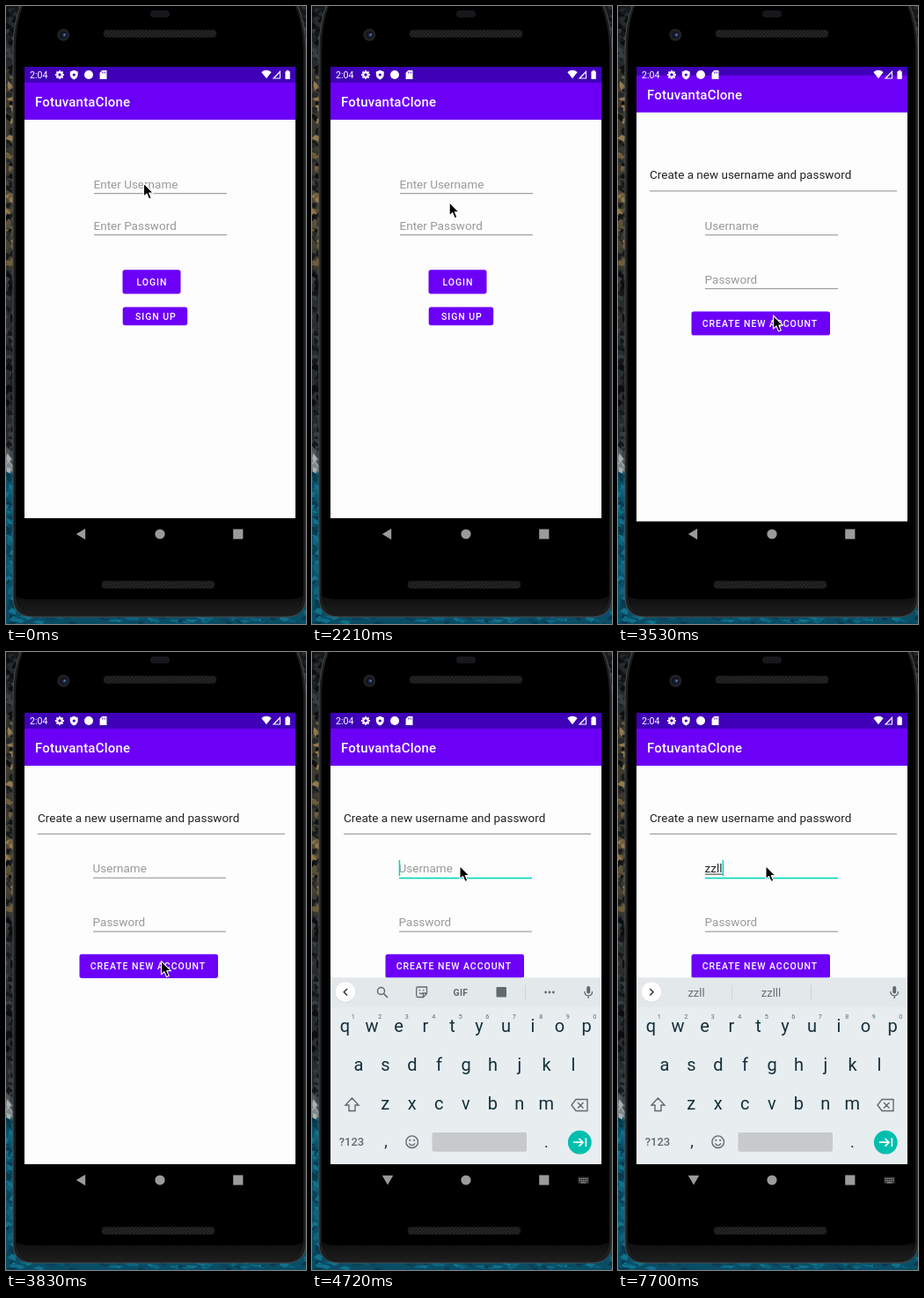
Recreate the animation shown at these times as an HTML page. Size 341 by 701 pixels, loop 8 s.

```html
<!DOCTYPE html>
<html lang="en">
<head>
<meta charset="utf-8">
<title>Sign-up demo</title>
<style>
  html, body { margin: 0; width: 100%; height: 100%; overflow: hidden; background: #000; }
  svg { display: block; width: 100%; height: 100%; }
  text { font-family: Roboto, sans-serif; white-space: pre; }
</style>
</head>
<body>
<svg id="stage" viewBox="0 0 341 701" xmlns="http://www.w3.org/2000/svg"></svg>
<script>
const LOOP = 8000, TICK = 147.4;
const PURPLE = '#6c00f7', DARK = '#3f00b8', TEAL = '#00d5c0', KEY = '#14303b', ICON = '#5f6a70';

const rect = (x, y, w, h, fill, r = 0, more = '') =>
  `<rect x="${x}" y="${y}" width="${w}" height="${h}" rx="${r}" fill="${fill}" ${more}/>`;
const circle = (x, y, r, fill, more = '') => `<circle cx="${x}" cy="${y}" r="${r}" fill="${fill}" ${more}/>`;
const path = (d, fill, more = '') => `<path d="${d}" fill="${fill}" ${more}/>`;
const line = (d, color, w = 1.4) => path(d, 'none', `stroke="${color}" stroke-width="${w}"`);
const text = (x, y, size, fill, str, more = '') =>
  `<text x="${x}" y="${y}" font-size="${size}" fill="${fill}" ${more}>${str}</text>`;
const group = (id, body, more = '') => `<g id="${id}" ${more}>${body}</g>`;
const mid = 'text-anchor="middle"';

const hint = (x, y, str, id = '') => text(x, y, 13.5, '#999', str, id && `id="${id}"`);
const field = (x, y, w, id = '') => rect(x, y, w, 1, '#8c8c8c', 0, id && `id="${id}"`);
const button = (x, y, w, h, tx, ty, label) => rect(x, y, w, h, PURPLE, 2.7) +
  text(tx, ty, 10.5, '#fff', label, 'font-weight="500" letter-spacing=".94"');

function seeded(seed) {
  return () => (seed = (seed * 16807) % 2147483647) / 2147483647;
}

// Rough coast along the edges: dark rock with sunlit patches, foam, then water
function coast() {
  const rnd = seeded(42);
  const pick = list => list[Math.floor(rnd() * list.length)];
  const tones = y => y > 530 ? ['#07506a', '#0d6480', '#0a4258', '#12718c', '#083a4e']
    : y > 505 ? ['#7d8688', '#aab0b0', '#3b4448']
    : y > 70 && y < 300 ? ['#17191a', '#25282a', '#0e1012', '#6f5c3a', '#94794d', '#3c382e']
    : ['#14181b', '#262b2e', '#0b0e10', '#363c3f'];
  const patch = (x, y, w, h) =>
    path(`M${x} ${y}l${w * rnd()} ${-h * rnd()}l${w} ${h * rnd()}l${-w * rnd()} ${h}Z`, pick(tones(y)));
  let out = '';
  for (let y = 0; y < 701; y += 3) {
    out += patch(rnd() * 9 - 3, y, 5, 6) + patch(332 + rnd() * 8, y, 5, 6);
    if (y < 40) out += patch(rnd() * 14, y, 6, 6);
  }
  for (let x = 0; x < 341; x += 5) out += patch(x, 692 + rnd() * 8, 7, 3);
  return out;
}

function backdrop() {
  const stops = [[0, '#15181b'], [.1, '#252a2d'], [.14, '#443d2c'], [.25, '#35352f'], [.35, '#5c5138'],
    [.43, '#2d2f2e'], [.7, '#24292c'], [.74, '#7b8284'], [.76, '#0b536c'], [.85, '#0a5a75'], [1, '#094c64']];
  return `<defs>
    <linearGradient id="rock" x2="0" y2="1">${stops.map(([o, c]) => `<stop offset="${o}" stop-color="${c}"/>`).join('')}</linearGradient>
    <linearGradient id="chin" x2="0" y2="1"><stop stop-color="#0e0e0e"/><stop offset="1" stop-color="#1d1d1d"/></linearGradient>
    <pattern id="mesh" width="4" height="4" patternUnits="userSpaceOnUse">${rect(0, 0, 4, 4, '#1a1a1a')}${line('M0 4L4 0', '#303030', 1)}</pattern>
    <clipPath id="reveal">${rect(0, 69, 341, 540, '#000', 0, 'id="revealBox"')}</clipPath>
    <clipPath id="screen">${rect(21, 69, 308, 512, '#000')}</clipPath>
  </defs>` + rect(0, 0, 341, 701, 'url(#rock)') + coast();
}

function phone() {
  const grille = (x, y) => rect(x, y, 128, 8.2, 'url(#mesh)', 3.5, 'stroke="#1b1b1b" stroke-width=".8"');
  return path('M17 -2Q8 20 8 48V672Q9 693 31 693H318Q340 693 341 672V48Q340 18 331 -2Z', '#1c1d1e', 'stroke="#4b4d4e"') +
    path('M20 -2Q11 20 11 48V668Q14 690 32 690H317Q335 690 338 668V48Q337 18 328 -2Z', '#000') +
    path('M12 669Q16 673 28 673H321Q333 673 337 669Q335 690 317 690H32Q14 690 12 669Z', 'url(#chin)') +
    rect(164, 5, 22, 8, '#17171c', 4) + grille(111, 27.2) + grille(109, 652.3) +
    circle(65.3, 32.8, 7, '#212225') + circle(65.3, 32.8, 4.2, '#11151f') +
    circle(66.2, 33, 2, '#2b4475') + circle(67, 32.4, .8, '#6f92d0');
}

const windowBase = () => rect(21, 69, 308, 512, '#fdfdfd') + rect(21, 69, 308, 60, PURPLE) + rect(21, 69, 308, 18, DARK) +
  text(33, 114, 15, '#fff', 'FotuvantaClone', 'font-weight="500" letter-spacing=".2"');

function loginPage() {
  return windowBase() + hint(99.5, 207, 'Enter Username') + field(100, 212.2, 151) +
    hint(99.5, 254, 'Enter Password') + field(100, 259.2, 151) +
    button(132.5, 299.2, 66, 27.2, 148.5, 317, 'LOGIN') + button(132.7, 341.6, 73.5, 20.6, 147, 356.2, 'SIGN UP') +
    rect(132.7, 341.6, 73.5, 20.6, '#fff', 2.7, 'id="press" opacity=".24"');
}

function signupPage() {
  return windowBase() + text(36, 192.6, 13.5, '#222', 'Create a new username and password') + field(36, 205.8, 281) +
    hint(98.6, 250, 'Username', 'userHint') + field(99, 255.7, 151, 'userLine') +
    text(98.6, 250, 13.5, '#222', '', 'id="typed"') + rect(99, 251.6, 0, 1, '#333', 0, 'id="compose"') +
    rect(99, 236, 1.5, 18, TEAL, 0, 'id="caret"') +
    hint(98.6, 311, 'Password') + field(99, 316.6, 151) +
    button(83.5, 342.8, 157.5, 27.2, 95.8, 360.2, 'CREATE NEW ACCOUNT');
}

function statusIcons() {
  const teeth = Array.from({ length: 8 }, (_, i) => rect(-1, -5, 2, 3, '#fff', 0, `transform="rotate(${i * 45})"`)).join('');
  return text(27, 82, 10.6, '#fff', '2:04') +
    `<g transform="translate(61 78)">${teeth}${circle(0, 0, 2.7, 'none', 'stroke="#fff" stroke-width="2"')}</g>` +
    path('M77.3 72.8L81.7 74.4V78Q81.5 81.8 77.3 83.5Q73 81.8 72.8 78V74.4Z', '#fff') +
    circle(77.3, 78, 1.6, DARK) + circle(94, 78, 5, '#fff') +
    path('M109.3 73H114.5V83H106.6V75.7Z', '#fff') + line('M109.5 74.5V76.5M111.2 74.5V76.5M112.9 74.5V76.5', DARK, .7) +
    path('M290.3 75Q296 70.6 301.7 75L296 82.3Z', '#fff') +
    path('M312 73V82.5H302.7Z', '#fff') + path('M311 76V81.5H305.6Z', DARK) +
    rect(317.4, 74, 5.4, 9, '#fff', .8) + rect(318.9, 72.8, 2.4, 2, '#fff');
}

function keyboard() {
  const row = (keys, x, y) => [...keys].map((k, i) => text(x + 30.5 * i, y, 20, KEY, k, mid)).join('');
  const digits = [...'1234567890'].map((d, i) => text(46.7 + 30.5 * i, 415.8, 7.2, ICON, d, mid)).join('');
  const tools =
    line('M40 382L36.3 385.8L40 389.6', '#333', 1.5) +
    circle(78.5, 384.5, 4, 'none', `stroke="${ICON}" stroke-width="1.5"`) + line('M81.5 387.5L86 392', ICON, 1.7) +
    line('M120 380H130.5V387.5L126.5 391.5H120Q118.7 391.5 118.7 390V381.5Q118.7 380 120 380ZM130.5 387H126.5V391M122 386.5Q124 389 126 386.5', ICON, 1.3) +
    circle(122.4, 383.6, .9, ICON) + circle(126.8, 383.6, .9, ICON) +
    text(169, 389.7, 10.5, ICON, 'GIF', mid + ' font-weight="700" letter-spacing=".3"') +
    rect(209.5, 380, 11.5, 11.5, ICON, 1) +
    rect(242, 378, 1, 16, '#cfd3d6') + [265.6, 270, 274.4].map(x => circle(x, 386, 1.4, ICON)).join('');
  const words = line('M36.3 382L40 385.8L36.3 389.6', '#333', 1.5) +
    [89, 174, 248].map((x, i) => text(x, 391, 13, '#667178', '', `${mid} id="word${i}"`)).join('') +
    rect(129, 378, 1, 16, '#cfd3d6') + rect(219, 378, 1, 16, '#cfd3d6');
  return rect(21, 369.5, 308, 211.5, '#e8edf0') + rect(21, 369.5, 308, 33.5, '#e3e8eb') +
    circle(38, 386.2, 11.3, '#cfd4d7') + circle(38, 385.7, 11.2, '#fff') + group('tools', tools) + group('words', words) +
    rect(312.2, 379, 4, 8.5, ICON, 2) + line('M309.8 385Q309.8 389.8 314.2 389.8Q318.6 389.8 318.6 385M314.2 389.8V393', ICON, 1.3) +
    row('qwertyuiop', 37.5, 431.3) + digits + row('asdfghjkl', 53, 475) + row('zxcvbnm', 83.3, 518.8) +
    line('M45.5 506L53 514H49V520.5H42V514H38Z', ICON, 1.4) +
    line('M300 507.5H313V520.5H300L295 514ZM302 511L308.5 517.5M308.5 511L302 517.5', ICON, 1.4) +
    text(45, 560.3, 13, ICON, '?123', mid + ' font-weight="500"') + text(84, 561, 18, KEY, ',', mid) +
    circle(113.7, 555.7, 6.8, 'none', `stroke="${ICON}" stroke-width="1.4"`) +
    circle(111.3, 553.8, 1.1, ICON) + circle(116.1, 553.8, 1.1, ICON) + line('M110.3 557.3Q113.7 561.8 117.1 557.3', ICON, 1.3) +
    rect(136.5, 545, 107.5, 21.8, '#c6cacd', 2) + text(266.3, 562, 18, KEY, '.', mid) +
    circle(304.3, 556.2, 13.4, '#00bfae') + line('M297 556.2H307.5M303.5 551.8L308 556.2L303.5 560.6M311.3 551.3V561', '#fff', 1.7);
}

function navIcons() {
  const g = '#9b9b9b';
  let dots = '';
  for (let y = 0; y < 2; y++) for (let x = 0; x < 5; x++) dots += rect(303.6 + x * 2.1, 596.8 + y * 2.2, 1.2, 1.2, g);
  return path('M79.8 599L90.2 592.8V605.2Z', g, 'id="back"') + path('M79.7 593.8H92.3L86 604.4Z', g, 'id="down"') +
    circle(175, 599, 5.6, g) + rect(258.2, 593.4, 11.2, 11.2, g) +
    group('switcher', rect(302.4, 595.4, 12.4, 7.6, '#333', 1) + dots + rect(305.5, 601.3, 6, 1.1, g));
}

const stage = document.getElementById('stage');
stage.innerHTML = backdrop() + phone() +
  group('oldClip', group('login', loginPage()), 'clip-path="url(#screen)"') +
  group('newClip', group('signup', signupPage()), 'clip-path="url(#reveal)"') +
  group('keys', keyboard()) + statusIcons() + navIcons() +
  path('M0 0V15.2L3.5 12L6 18L8.8 16.8L6.3 11.1H11Z', '#000', 'id="pointer" stroke="#fff" stroke-width="1.1" stroke-linejoin="round"');

const el = {};
stage.querySelectorAll('[id]').forEach(n => el[n.id] = n);
const set = (n, attrs) => { for (const k in attrs) n.setAttribute(k, attrs[k]); };
const show = (n, on) => n.style.display = on ? '' : 'none';
const latest = (list, t) => list.filter(s => s[0] <= t).pop();

// [time, x, y] of the pointer tip
const moves = [[0, 156.5, 201], [150, 156.5, 201], [590, 176, 246], [885, 193, 285], [1110, 192, 272],
  [1330, 187.5, 257], [1910, 151, 200.5], [2060, 151, 200.5], [2500, 166, 265], [2800, 178, 371],
  [3100, 175.5, 352], [3390, 176.5, 351], [3830, 176.5, 351], [4420, 168, 241.5], [4570, 168, 242.5], [LOOP, 168, 242.5]];

// [time, text, suggestions]
const typing = [[0, '', []], [6520, 'z', []], [6660, 'zz', ['zz']], [6810, 'zz', ['zz', 'zzz', 'zzt']],
  [7550, 'zzl', ['zzl', 'zzll']], [7700, 'zzll', ['zzll', 'zzlll']]];

const blinks = [[0, 0], [4420, 1], [5020, 0], [5470, 1], [6070, 0], [6520, 1], [7250, 0], [7550, 1]];

function pointerAt(t) {
  const i = Math.max(1, moves.findIndex(m => m[0] > t));
  const [t0, x0, y0] = moves[i - 1], [t1, x1, y1] = moves[i];
  const p = (t - t0) / (t1 - t0);
  return [x0 + (x1 - x0) * p, y0 + (y1 - y0) * p];
}

function render(t) {
  const held = Math.floor((t + 8) / TICK) * TICK;
  const [x, y] = pointerAt(held);
  set(el.pointer, { transform: `translate(${x.toFixed(2)} ${y.toFixed(2)})` });

  const u = Math.min(1, Math.max(0, (held - 3270) / 400));
  const open = 1 - (1 - u) ** 1.6;
  show(el.press, t >= 3240);
  show(el.oldClip, open < 1);
  show(el.newClip, open > 0);
  set(el.login, { transform: `translate(0 ${-10 * open})` });
  set(el.signup, { transform: `translate(0 ${21 * (1 - open)})` });
  set(el.revealBox, { y: 69 + 512 * (1 - open) });

  const focused = t >= 4420;
  set(el.userLine, { fill: focused ? TEAL : '#8c8c8c', height: focused ? 1.6 : 1 });

  const [, typed, words] = latest(typing, t);
  el.typed.textContent = typed;
  show(el.userHint, !typed);
  const w = typed ? el.typed.getComputedTextLength() : 0;
  set(el.compose, { width: w });
  set(el.caret, { x: 98.7 + w });
  show(el.caret, latest(blinks, t)[1]);

  const raised = t >= 4570, settled = t >= 4720;
  show(el.keys, raised);
  set(el.keys, { transform: `translate(0 ${settled ? 0 : 36})`, opacity: settled ? 1 : .85 });
  show(el.tools, !words.length);
  show(el.words, words.length);
  for (let i = 0; i < 3; i++) el['word' + i].textContent = words[i] || '';
  show(el.back, !raised);
  show(el.down, raised);
  show(el.switcher, raised);
}

const start = performance.now();
function frame() {
  render((performance.now() - start) % LOOP);
  requestAnimationFrame(frame);
}
frame();
</script>
</body>
</html>
```
